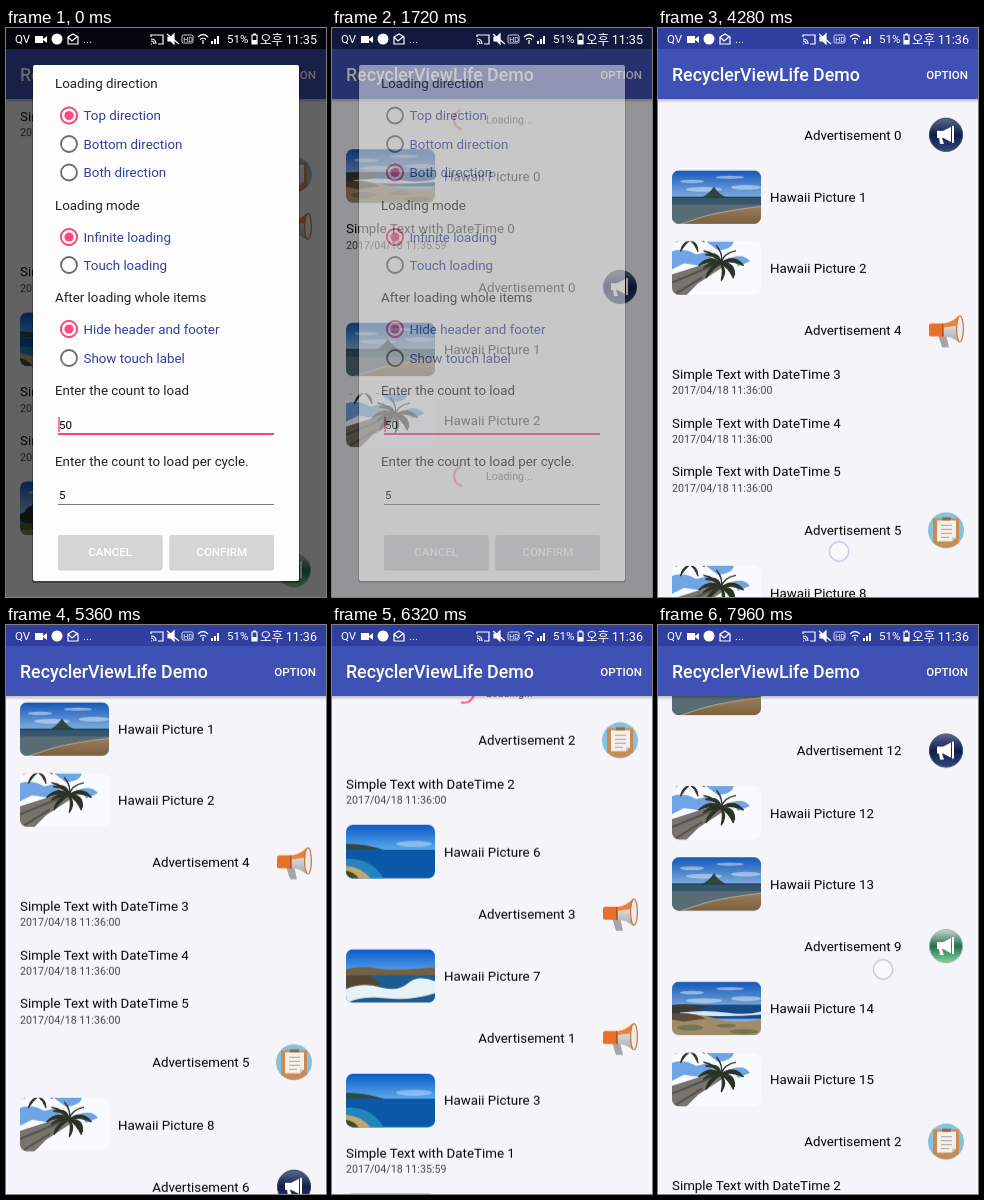
An HTML page for the animation above (8 s loop, 320 by 569 pixels).

```html
<!DOCTYPE html>
<html lang="en">
<head>
<meta charset="utf-8">
<title>RecyclerViewLife Demo</title>
<style>
html, body { margin: 0; width: 100%; height: 100%; overflow: hidden; background: #f5f4f8; }
svg.stage { display: block; width: 100vw; height: 100vh; }
text { font: 13.33px Roboto, "Noto Sans CJK KR", "Noto Sans CJK", sans-serif; fill: #000; }
.title { font-size: 17.78px; font-weight: 500; fill: #fff; }
.caps { font-size: 11.56px; font-weight: 500; fill: #fff; }
.date, .wait { font-size: 10.67px; fill: #444; }
.label { fill: #222; }
.choice { fill: #303f9f; }
.field { font-size: 11.56px; }
.status text { font-size: 11.5px; fill: #fff; }
.status .clock { font-size: 12.6px; }
</style>
</head>
<body>
<svg class="stage" viewBox="0 0 320 569" xmlns="http://www.w3.org/2000/svg">
<defs>
  <linearGradient id="sky" x2="0" y2="1"><stop stop-color="#1457b8"/><stop offset=".5" stop-color="#7faede"/></linearGradient>
  <linearGradient id="deep" x2="0" y2="1"><stop stop-color="#0b5ac6"/><stop offset=".45" stop-color="#5aa6ec"/></linearGradient>
  <linearGradient id="sand" x2="0" y2="1"><stop stop-color="#9a8060"/><stop offset="1" stop-color="#7c5f3c"/></linearGradient>
  <linearGradient id="shade" x2="0" y2="1"><stop stop-opacity=".22"/><stop offset="1" stop-opacity="0"/></linearGradient>
  <linearGradient id="navyFill" x2="0" y2="1"><stop stop-color="#5a6a92"/><stop offset=".5" stop-color="#101d48"/><stop offset="1" stop-color="#30497f"/></linearGradient>
  <linearGradient id="greenFill" x2="0" y2="1"><stop stop-color="#c6d6cd"/><stop offset=".5" stop-color="#23704f"/><stop offset="1" stop-color="#7fd6a0"/></linearGradient>
  <linearGradient id="metal" x2="0" y2="1"><stop stop-color="#fafafa"/><stop offset="1" stop-color="#a9a9ab"/></linearGradient>
  <clipPath id="card"><rect width="89" height="53.5" rx="7"/></clipPath>
  <g id="clouds" fill="#e8f0fa" opacity=".5">
    <ellipse cx="20" cy="11" rx="12" ry="1.8"/><ellipse cx="58" cy="7" rx="14" ry="1.6"/>
    <ellipse cx="74" cy="17" rx="15" ry="2.4"/><ellipse cx="32" cy="19" rx="18" ry="2.4"/>
  </g>
  <path id="crown" d="M0 0q-4-5-9 1q5-3 9-1q-5 1-6 7q3-5 6-7q5-5 9 1q-5-3-9-1q5 1 5 7q-2-5-5-7q1-5 6-6q-5 1-6 6q-2-5-7-6q6 2 7 6"/>
  <g id="A">
    <rect width="89" height="54" fill="url(#sky)"/><use href="#clouds"/>
    <path d="M28 28Q37 24 42 16Q46 24 57 28Z" fill="#2f4540"/>
    <rect y="27" width="89" height="9" fill="#35566e"/>
    <path d="M0 27H89" stroke="#24434f" stroke-width="1.5"/>
    <rect y="35" width="89" height="19" fill="url(#sand)"/>
    <path d="M0 34H89V36Q54 40 32 46L8 54H0Z" fill="#586c76"/>
    <path d="M8 54L32 46Q54 40 89 36" fill="none" stroke="#b9a68a"/>
  </g>
  <g id="P">
    <rect width="89" height="54" fill="url(#sky)"/><use href="#clouds"/>
    <rect y="37" width="89" height="6" fill="#2c6ba0"/><rect y="42" width="89" height="12" fill="#48652a"/>
    <path d="M0 49Q45 45 89 50V54H0Z" fill="#7f8644"/>
    <g fill="#1e3020"><ellipse cx="20" cy="31" rx="15" ry="8"/><ellipse cx="10" cy="36" rx="11" ry="6"/><ellipse cx="60" cy="37" rx="18" ry="6"/><ellipse cx="83" cy="38" rx="9" ry="5"/></g>
    <path d="M20 34V47M28 36V47M42 16L44 46M52 13L54 46M68 12L67 46M80 15L78 46" stroke="#37332a" stroke-width="1.4"/>
    <g fill="#203420" stroke="#203420"><use href="#crown" x="42" y="17"/><use href="#crown" x="53" y="11"/><use href="#crown" x="68" y="11"/><use href="#crown" x="80" y="16"/></g>
  </g>
  <g id="B">
    <rect width="89" height="54" fill="url(#sky)"/><use href="#clouds"/>
    <rect y="23" width="89" height="14" fill="#154a86"/>
    <path d="M0 24Q14 21 36 25L20 30 0 31Z" fill="#3f3a30"/>
    <path d="M8 31Q34 28 54 31T89 30V33Q50 36 8 33Z" fill="#dce6ee"/>
    <path d="M0 33Q24 31 44 37T89 38V54H0Z" fill="#a38a68"/>
    <path d="M0 32Q20 30 34 37L12 40 0 38Z" fill="#5d4c38"/>
    <g fill="#74754c"><ellipse cx="18" cy="46" rx="13" ry="3"/><ellipse cx="54" cy="44" rx="10" ry="2"/><ellipse cx="72" cy="50" rx="14" ry="2.5"/></g>
  </g>
  <g id="W">
    <rect width="89" height="54" fill="#f8fafe"/>
    <path d="M0 10Q12 6 24 13L38 10 40 18 26 24 12 22 0 28ZM34 0H62Q60 8 46 9ZM60 16Q72 12 78 20L66 25Z" fill="#6fa5e6"/>
    <path d="M0 33L44 19 52 25 26 42 14 54H0Z" fill="#77736d"/><path d="M0 41L44 23M4 52L30 36" stroke="#55524d" stroke-width="2"/>
    <g fill="#2a3326" stroke="#2a3326" stroke-width=".6">
      <use href="#crown" transform="translate(49 22) scale(2.5 2.1)"/><use href="#crown" transform="translate(49 22) rotate(35) scale(2)"/>
      <use href="#crown" transform="translate(18 -1) scale(1.6)"/>
    </g>
  </g>
  <g id="C">
    <rect width="89" height="54" fill="url(#deep)"/>
    <ellipse cx="68" cy="19" rx="18" ry="3" fill="#fff" opacity=".35"/>
    <rect y="25" width="89" height="29" fill="#0b57a8"/>
    <path d="M0 19Q20 19 38 25H0Z" fill="#2f4a48"/>
    <path d="M0 34Q26 33 38 54H0Z" fill="#2484be"/><path d="M0 41Q15 42 25 54H0Z" fill="#c4a56f"/><path d="M0 46Q8 47 13 54H0Z" fill="#3f4a2d"/>
  </g>
  <g id="D">
    <rect width="89" height="54" fill="url(#deep)"/>
    <path d="M0 20Q14 16 30 19T89 18V30H0Z" fill="#756044"/><rect y="26" width="89" height="28" fill="#1c5c92"/>
    <path d="M0 27L22 26 36 34 24 40 0 37Z" fill="#57452f"/>
    <path d="M0 40Q16 33 34 38T62 34T89 32V44Q64 52 40 49T0 54Z" fill="#e8f1f6"/>
  </g>
  <path id="speaker" d="M-9-4H-3L5-8V7L-3 3H-4L-2 9H-6L-7 3H-9ZM6-9H8V8H6Z" fill="#fff"/>
  <g id="navy"><circle r="16.6" fill="url(#navyFill)" stroke="#39466e"/><use href="#speaker"/></g>
  <g id="green"><circle r="16.6" fill="url(#greenFill)" stroke="#9bb5a6"/><use href="#speaker"/></g>
  <g id="clip">
    <circle r="18" fill="#86c1de"/><path d="M-13-12H13V12Q0 23-13 12Z" fill="#c98b52"/>
    <path d="M-9-10H10V7L6 11H-9Z" fill="#f4f0ea"/><path d="M10 7H6V11Z" fill="#cfc6ba"/>
    <path d="M-5-5H6M-5-1H6M-5 3H6M-5 7H3" stroke="#a5a5a5"/><path d="M-4-13H5V-10H-4Z" fill="#8d6a48"/>
  </g>
  <g id="horn">
    <path d="M-8 4H0L3 17H-4Z" fill="#a4a5a8"/>
    <path d="M-17-5Q-17-7-14-7H-3V6H-14Q-17 6-17 4Z" fill="#e8702a"/><path d="M-3-7V6" stroke="#a84a1c" stroke-width="1.5"/>
    <path d="M-2-7Q6-8 13-15V12Q6 6-2 6Z" fill="url(#metal)"/><path d="M-2-7Q6-8 13-15V-5L-2-3Z" fill="#ee8238"/>
    <ellipse cx="14" cy="-1.5" rx="3.4" ry="13" fill="#ececec" stroke="#c9763f" stroke-width="1.2"/>
  </g>
</defs>

<rect width="320" height="569" fill="#f5f4f8"/>
<g id="oldList"></g>
<g id="newList"></g>
<rect y="71" width="320" height="4" fill="url(#shade)"/>
<rect y="20" width="320" height="51" fill="#3f51b5"/>
<text class="title" x="14" y="53">RecyclerViewLife Demo</text>
<text class="caps" x="310" y="51" text-anchor="end">OPTION</text>
<rect width="320" height="21" fill="#303f9f"/>
<g id="dim"><rect width="320" height="569" opacity=".6"/><rect width="320" height="21" opacity=".8"/></g>

<g class="status" fill="none" stroke="#fff" stroke-width="1.2">
  <g stroke="none"><text x="9" y="15">QV</text><text x="77" y="15">...</text><text x="221" y="15">51%</text>
    <text class="clock" x="254" y="15.5">오후</text><text class="clock" id="early" x="311" y="15.5" text-anchor="end">11:35</text>
    <text class="clock" id="late" x="311" y="15.5" text-anchor="end">11:36</text></g>
  <path d="M29 8H37V15H29ZM37 11L41 8V15L37 12Z" fill="#fff" stroke="none"/>
  <circle cx="51" cy="11" r="5.5" fill="#fff" stroke="none"/>
  <path d="M62 9L67 6 72 9V16H62ZM62 9L66 13 72 8"/>
  <path d="M145 9V7H157V16H152M145 16h1M145 13q3 0 3 3M145 11q5 0 5 5"/>
  <path d="M162 9H165L168 6V16L165 13H162Z" fill="#fff"/><path d="M161 6L173 16"/>
  <rect x="176" y="7" width="11" height="8" rx="1.5" stroke-width=".8"/><text x="177.3" y="13.5" stroke="none" style="font-size:7px">HD</text>
  <path d="M192 9Q197 4 202 9M194 11.500Q197 9 200 11.500M197 12V16"/>
  <path d="M206 16V13M209 16V11M212 16V8" stroke-width="2"/>
  <path d="M246 7H251V16H246ZM247 6H250"/><path d="M246 12H251V16H246Z" fill="#fff" stroke="none"/>
</g>

<g id="dialog">
  <rect x="26" y="38" width="268" height="517" rx="2" opacity=".3"/>
  <rect x="27" y="37" width="266" height="516" rx="2" fill="#fdfdfd"/>
  <path d="M52 406H268" stroke="#ff4081" stroke-width="1.8"/><path d="M53 389V404" stroke="#ff4081" stroke-width="1.4"/>
  <path d="M52 476.5H268" stroke="#777"/>
  <text class="field" x="53" y="401">50</text><text class="field" x="53" y="471">5</text>
</g>
<circle id="touch" r="9.7" fill="#fafafd" fill-opacity=".8" stroke="#c3c8e0" stroke-width="1.4"/>
</svg>

<script>
const LOOP = 8000, PINK = '#ff4a7a';
const $ = id => document.getElementById(id);

function add(parent, tag, attrs, text) {
  const el = document.createElementNS('http://www.w3.org/2000/svg', tag);
  for (const key in attrs) el.setAttribute(key, attrs[key]);
  if (text) el.textContent = text;
  return parent.appendChild(el);
}

// steps: [time, value, easing to the next step]
function track(el, prop, steps) {
  const all = [[0, steps[0][1]], ...steps, [LOOP, steps.at(-1)[1]]];
  el.animate(all.map(([t, value, easing = 'linear']) =>
    ({ offset: t / LOOP, [prop]: value, easing })), { duration: LOOP, iterations: Infinity });
}

function show(el, from, to = LOOP, fade = 0) {
  const steps = from ? [[from, 0], [from + fade, 1]] : [[0, 1]];
  if (to < LOOP) steps.push([to, 1], [to, 0]);
  track(el, 'opacity', steps);
}

// Row heights of 80, 60, 55 and 46 dp on a 360 dp wide screen
const DP = 320 / 360, LIST_TOP = 80 * DP, LOADER = 46 * DP;
const heights = { P: 80 * DP, A: 60 * DP, T: 55 * DP };
const photos = 'BAWCAPCDWPCDWABWA';
const adIcons = 'navy horn clip horn horn clip navy green horn green clip horn navy'.split(' ');

const drawItem = {
  P(g, n) {
    const frame = add(g, 'g', { transform: 'translate(14 8.9)', 'clip-path': 'url(#card)' });
    add(frame, 'use', { href: '#' + photos[n] });
    add(g, 'text', { x: 112, y: 40.4 }, 'Hawaii Picture ' + n);
  },
  A(g, n) {
    add(g, 'text', { x: 243.5, y: 31.5, 'text-anchor': 'end' }, 'Advertisement ' + n);
    add(g, 'use', { href: '#' + adIcons[n], x: 288, y: 26.7 });
  },
  T(g, n) {
    add(g, 'text', { x: 14, y: 21.5 }, 'Simple Text with DateTime ' + n);
    add(g, 'text', { x: 14, y: 37.2, class: 'date' }, '2017/04/18 11:' + (n < 2 ? '35:59' : '36:00'));
  }
};

const heightOf = names => names.split(' ').reduce((sum, name) => sum + heights[name[0]], 0);

function placeItems(list, names, top) {
  const batch = add(list, 'g', {});
  for (const name of names.split(' ')) {
    const item = add(batch, 'g', { transform: `translate(0 ${top})` });
    drawItem[name[0]](item, +name.slice(1));
    top += heights[name[0]];
  }
  return batch;
}

function placeLoader(top, from, to) {
  const row = add($('newList'), 'g', { transform: `translate(0 ${top})` });
  const hub = add(row, 'g', { transform: 'translate(132 20)' });
  const arc = add(hub, 'path', { d: 'M10 0A10 10 0 0 1 -8.66 5', fill: 'none', stroke: PINK, 'stroke-width': 2 });
  add(row, 'text', { x: 154, y: 24, class: 'wait' }, 'Loading...');
  track(arc, 'transform', [[0, 'rotate(202deg)'], [LOOP, 'rotate(3082deg)']]);
  show(row, from, to);
}

// Lists
const RESET = 1640, START = 2 * heights.P;
$('oldList').setAttribute('transform', `translate(0 ${LIST_TOP})`);
placeItems($('oldList'), 'T0 A2 A1 T1 P3 T2 T3 P5 A9', 0);
show($('oldList'), 0, RESET);

const above = [
  [2280, 'A1 P3 T1 P4 P5'], [2560, 'A2 T2 P6 A3 P7'],
  [6760, 'P12 P13 A9 P14 P15'], [7640, 'T9 A10 A11 P16 A12']
];
const below = [
  [RESET, 'P0 T0 A0 P1 P2'], [2560, 'A4 T3 T4 T5 A5'],
  [3880, 'P8 A6 T6 P9 A7'], [4920, 'T7 P10 A8 P11 T8']
];

// Each batch takes the place of the loader at its end of the list.
function grow(batches, up) {
  let edge = START, since = RESET;
  for (const [time, names] of batches) {
    if (time > since) placeLoader(up ? edge - LOADER : edge, since, time);
    const height = heightOf(names);
    const batch = placeItems($('newList'), names, up ? edge - height : edge);
    show(batch, time, LOOP, time > RESET ? 120 : 0);
    edge += up ? -height : height;
    since = time;
  }
}
grow(above, true);
grow(below, false);

const out = 'cubic-bezier(.2,.6,.4,1)';
const scroll = [
  [RESET, 101], [2280, 101], [2280, 0], [3200, 0], [3400, 190], [3520, 252.7],
  [4280, 252.7], [4320, 275], [4440, 470], [4560, 552],
  [5200, 552], [5360, 320, out], [5840, 48], [5920, 8], [6040, -143, out], [6480, -512],
  [6880, -512], [6960, -542.3], [7080, -697, out], [7360, -849.5], [7880, -849.5], [7960, -889.5], [LOOP, -909]
];
track($('newList'), 'transform', scroll.map(([t, pos, ease]) => [t, `translate(0px, ${LIST_TOP - pos}px)`, ease]));

// Dialog
const dialog = $('dialog');
const labels = [['Loading direction', 60], ['Loading mode', 181.5], ['After loading whole items', 274],
  ['Enter the count to load', 366.5], ['Enter the count to load per cycle.', 437.5]];
for (const [text, y] of labels) add(dialog, 'text', { x: 49, y, class: 'label' }, text);

const PICK = 520;
const choices = [['Top direction', 87.5, 0, PICK], ['Bottom direction', 116], ['Both direction', 144.5, PICK, LOOP],
  ['Infinite loading', 209, 0, LOOP], ['Touch loading', 237],
  ['Hide header and footer', 301, 0, LOOP], ['Show touch label', 330]];
for (const [text, y, from, to] of choices) {
  add(dialog, 'text', { x: 77.5, y: y + 4.6, class: 'choice' }, text);
  add(dialog, 'circle', { cx: 63, cy: y, r: 8, fill: 'none', stroke: '#6b6b6b', 'stroke-width': 1.8 });
  if (to) {
    const mark = add(dialog, 'g', {});
    add(mark, 'circle', { cx: 63, cy: y, r: 8, fill: '#fdfdfd', stroke: PINK, 'stroke-width': 1.8 });
    add(mark, 'circle', { cx: 63, cy: y, r: 4.6, fill: PINK });
    show(mark, from, to, 120);
  }
}
for (const [text, x] of [['CANCEL', 52], ['CONFIRM', 163.5]]) {
  add(dialog, 'rect', { x, y: 508.5, width: 104.5, height: 34, rx: 2, opacity: .18 });
  add(dialog, 'rect', { x, y: 507, width: 104.5, height: 34, rx: 2, fill: '#d5d5d6' });
  add(dialog, 'text', { x: x + 52.2, y: 528, class: 'caps', 'text-anchor': 'middle' }, text);
}
track(dialog, 'opacity', [[RESET, 1], [1800, 0]]);
track($('dim'), 'opacity', [[RESET, 1], [1880, 0]]);
show($('early'), 0, 2360);
show($('late'), 2360);

// Finger: [time, x, y] points of each press
const presses = [
  [[400, 120, 144], [PICK, 120, 144]],
  [[1360, 242, 524], [1600, 242, 524]],
  [[3200, 185, 500], [3400, 195, 290]],
  [[4280, 181, 524], [4320, 183, 502], [4440, 195, 307]],
  [[5200, 205, 240], [5360, 215, 470]],
  [[5840, 216, 290], [5920, 221, 330], [6040, 230, 480]],
  [[6880, 204, 255], [6960, 206, 285], [7080, 215, 440]],
  [[7880, 222, 304], [7960, 225, 344], [LOOP, 227, 364]]
];
const shown = [[0, 0]], moves = [];
for (const press of presses) {
  const start = press[0][0], end = press.at(-1)[0];
  shown.push([start, 0], [start, 1], [end, 1]);
  if (end < LOOP) shown.push([end, 0]);
  press.forEach(([t, x, y], i) =>
    moves.push([t, `translate(${x}px, ${y}px)`, i < press.length - 1 ? 'linear' : 'step-end']));
}
track($('touch'), 'opacity', shown);
track($('touch'), 'transform', moves);
</script>
</body>
</html>
```
